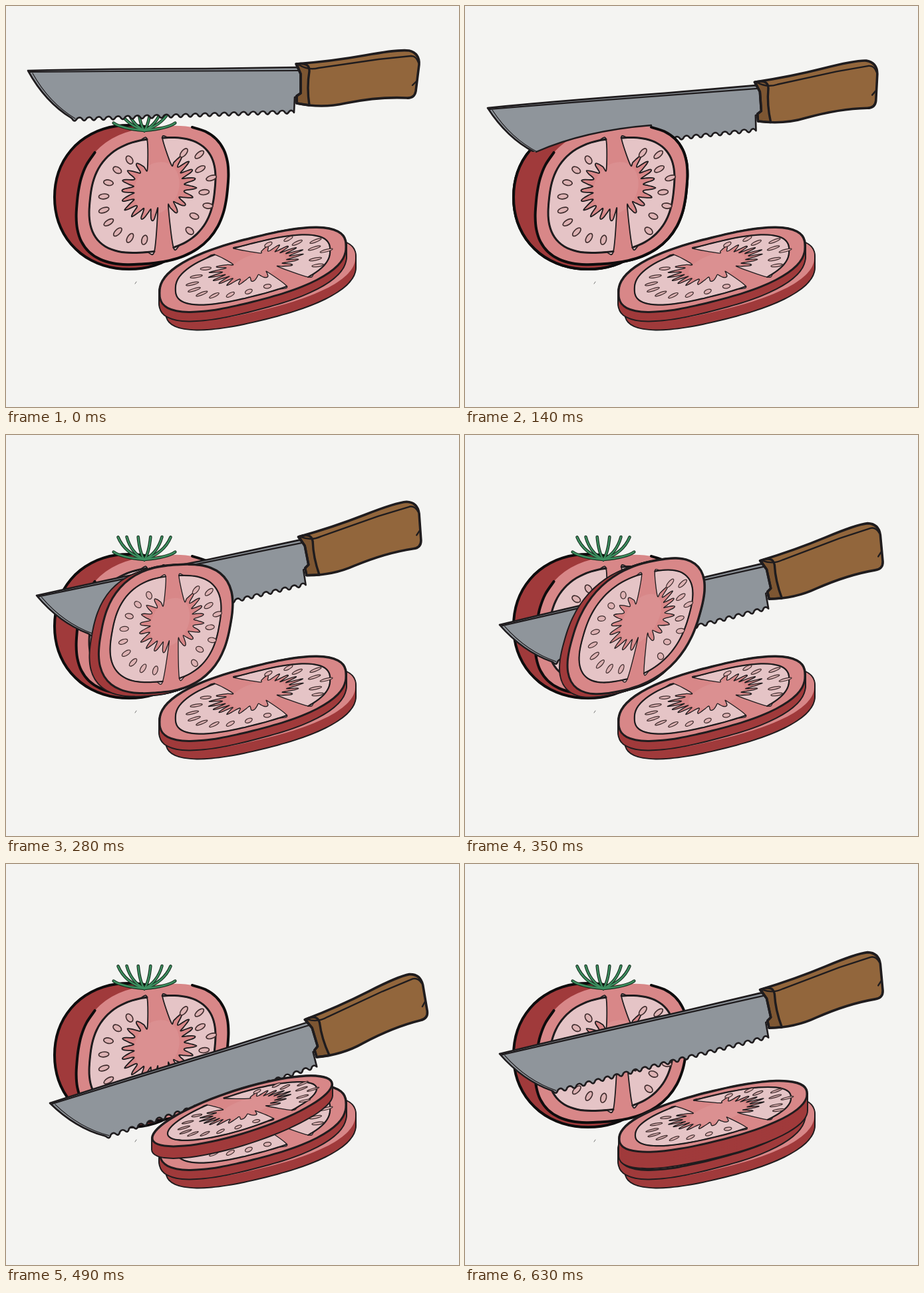
Write an HTML page with a canvas that moves like this. It is 681x602 px and loops after 0.7 s.

```html
<!DOCTYPE html>
<html lang="en">
<head>
<meta charset="utf-8">
<title>Slicing a tomato</title>
<style>
html, body { margin: 0; width: 100%; height: 100%; overflow: hidden; background: #f4f4f2; }
canvas { display: block; }
</style>
</head>
<body>
<canvas id="stage" width="681" height="602"></canvas>
<script>
const ctx = document.getElementById('stage').getContext('2d');
const INK = '#1f1c1e', RED = '#a03a3b', FLESH = '#d88788', CORE = '#db9091',
  PULP = '#e5c4c6', SEED = '#deb3b4', STEEL = '#8f959b', WOOD = '#92663c', LEAF = '#3d8f60';
const { sin, cos, PI } = Math, RAD = PI / 180;
ctx.lineJoin = ctx.lineCap = 'round';

function range(from, to, n, make) {
  return Array.from({ length: n }, (_, i) => make(from + (to - from) * i / (n - 1), i));
}

// Smooth path through points (Catmull-Rom)
function curve(pts, open) {
  const path = new Path2D(), n = pts.length;
  const at = i => open ? pts[Math.max(0, Math.min(n - 1, i))] : pts[(i + n) % n];
  path.moveTo(...pts[0]);
  for (let i = 0; i < (open ? n - 1 : n); i++) {
    const [a, b, c, d] = [at(i - 1), at(i), at(i + 1), at(i + 2)];
    path.bezierCurveTo(b[0] + (c[0] - a[0]) / 6, b[1] + (c[1] - a[1]) / 6,
      c[0] - (d[0] - b[0]) / 6, c[1] - (d[1] - b[1]) / 6, c[0], c[1]);
  }
  if (!open) path.closePath();
  return path;
}

function paint(path, fill, width, color = INK) {
  if (fill) { ctx.fillStyle = fill; ctx.fill(path); }
  if (width) { ctx.strokeStyle = color; ctx.lineWidth = width; ctx.stroke(path); }
}

// A disc is a superellipse of power p, sheared by slant and lean; spin turns its inside
function disc(x, y, rx, ry, options) {
  return { x, y, rx, ry, lean: 0, slant: 0, p: 2.2, spin: 0, dx: 0, dy: 0, line: 3, ...options };
}

function place(d, u, v) {
  return [d.x + u * d.rx + d.slant * v * d.ry, d.y + v * d.ry - d.lean * u * d.rx];
}

// Points along the rim, scaled by k, between two angles in degrees
function rim(d, k, from, to, n = 28) {
  return range(from, to, n, deg => {
    const c = cos(deg * RAD), s = sin(deg * RAD);
    const r = k / (Math.abs(c) ** d.p + Math.abs(s) ** d.p) ** (1 / d.p);
    return place(d, r * c, r * s);
  });
}

const outline = d => curve(rim(d, 1, 0, 350, 36));

// Wavy border of the core
function fingers(d, from, to, teeth) {
  const tx = 0.07 * cos(d.spin * RAD) + 0.11 * sin(d.spin * RAD);
  const ty = 0.07 * sin(d.spin * RAD) - 0.11 * cos(d.spin * RAD);
  return range(from, to, teeth * 6 + 1, (deg, i) => {
    const r = 0.42 - (0.08 + 0.02 * sin(i * 1.3)) * cos(i * PI / 3), a = (deg + d.spin) * RAD;
    return place(d, tx + r * cos(a), ty + r * sin(a));
  });
}

function seed(d, deg, r, weight) {
  const a = (deg + d.spin) * RAD;
  const shape = range(0, 315, 8, t => {
    const along = r + 0.068 * cos(t * RAD), across = 0.038 * sin(t * RAD);
    return place(d, along * cos(a) - across * sin(a), along * sin(a) + across * cos(a));
  });
  paint(curve(shape), SEED, weight, '#3f2c2d');
}

function lobe(d, weight, outer, inner, teeth) {
  const edge = rim(d, 0.83, outer[0] + d.spin, outer[1] + d.spin);
  paint(curve([...edge, ...fingers(d, ...inner, teeth)]), PULP, weight * 0.6);
  paint(curve(edge, true), null, weight);
}

function inside(d, weight) {
  paint(curve(range(0, 324, 10, t => place(d, 0.05 + 0.3 * cos(t * RAD), 0.38 * sin(t * RAD) - 0.1))), CORE);
  lobe(d, weight, [260, 83], [86, 238], 9);
  lobe(d, weight, [-86, 66], [62, -66], 8);
  range(94, 237, 9, deg => seed(d, deg, 0.65, weight * 0.55));
  range(-58, 46, 8, (deg, i) => seed(d, deg, i % 2 ? 0.79 : 0.69, weight * 0.55));
}

const face = disc(220, 284, 113, 103, { lean: .08, slant: -.1, p: 2.6 });
const body = disc(185, 287, 112, 108, { p: 2.1 });

function tomato() {
  paint(outline(body), RED, 4, '#0e0c0d');
  paint(outline(face), FLESH);
  paint(curve(rim(face, 1, -65, 220), true), null, 4, '#0e0c0d');
  inside(face, 3);
}

function stem() {
  for (const [width, color] of [[4.6, '#16301f'], [2.4, LEAF]])
    range(170, 10, 8, deg => {
      const dx = 47 * cos(deg * RAD), h = Math.min(33, 60 * sin(deg * RAD));
      paint(new Path2D(`M208 187Q${208 + dx * .75} ${187 - h * .3} ${208 + dx} ${186 - h}`), null, width, color);
    });
}

// Thick slice: its outline swept along dx, dy makes the skin
function slice(d) {
  const edge = outline(d);
  const sweep = (fill, width) => range(1, 0, 7, k => {
    ctx.save();
    ctx.translate(d.dx * k, d.dy * k);
    paint(edge, fill, width);
    ctx.restore();
  });
  sweep(null, 4);
  sweep(RED, 0);
  paint(edge, FLESH, d.line);
  inside(d, 2.2);
}

const pile = [
  disc(383, 411, 142, 46, { lean: .24, spin: -18, dy: 14, p: 2.4, line: 0 }),
  disc(371, 396, 140, 48, { lean: .25, spin: -18, dy: 13, p: 2.5 })
];

// Knife, drawn level with its tip at 33, 97
const blade = new Path2D('M33 97Q150 94 300 94L437 92L444 97V134L434 137L433 160');
for (let x = 433; x > 110; x -= 14.5) {
  const y = 157 + (433 - x) * 0.034;
  blade.quadraticCurveTo(x - 3, y - 2, x - 7, y + 1);
  blade.quadraticCurveTo(x - 11, y + 8, x - 14.5, y + 1.5);
}
blade.lineTo(98, 168);
blade.bezierCurveTo(72, 152, 50, 128, 33, 97);
const handle = new Path2D(
  'M436 87Q490 83 540 74T606 67Q622 71 621 88L616 128Q614 139 602 138Q560 136 510 146Q475 154 437 146V135L443 131V102Z');

function knife(x, y, degrees) {
  ctx.save();
  ctx.translate(x, y);
  ctx.rotate(degrees * RAD);
  ctx.translate(-33, -97);
  paint(blade, STEEL, 2.6);
  paint(new Path2D('M36 99L170 98L440 97'), null, 2.2);
  paint(new Path2D('M40 101C55 128 76 152 104 169'), null, 1.2);
  paint(handle, WOOD);
  paint(new Path2D('M437 87Q457 84 456 98Q452 122 456 149L437 146V135L443 131V102Z'), '#7d5632', 3.4);
  paint(new Path2D('M440 88Q454 97 470 93L560 80L609 75Q617 75 620 85M618 112L611 119'), null, 2.4);
  paint(handle, null, 3.6);
  ctx.restore();
}

// The part of the tomato in front of the sinking blade
function frontHalf() {
  const cut = 'M107 219Q180 187 280 179';
  ctx.save();
  ctx.clip(new Path2D(cut + 'H345V410H60V219Z'));
  tomato();
  ctx.restore();
  paint(new Path2D(cut), null, 2.4);
}

const opening = disc(230, 288, 105, 99, { lean: .07, slant: -.14, p: 2.6, dx: -12, dy: 3 });
const parting = disc(240, 291, 97, 96, { lean: .06, slant: -.18, p: 2.6, dx: -13, dy: 4 });
const leaning = disc(257, 287, 96, 98, { lean: .2, slant: -.28, p: 2.5, dx: -11, dy: 4 });
const falling = disc(330, 309, 127, 46, { lean: .5, spin: 48, p: 1.95, dx: -13, dy: 2 });
const landing = disc(355, 371, 135, 34, { lean: .3, spin: -18, p: 2, dy: 17 });
const landed = disc(373, 379, 141, 38, { lean: .24, spin: -18, p: 2.3, dy: 24 });

// at: knife tip and turn; front: blade sunk behind the face; cut: loose slice; over: it lies on the pile
const steps = [
  { at: [33, 97, 0] },
  { at: [33, 125, -2], front: true },
  { at: [34, 153, -4.1], front: true },
  { at: [40, 197, -7.8], cut: opening },
  { at: [46, 241, -11.2], cut: parting },
  { at: [52, 285, -12.4], cut: leaning },
  { at: [56, 322, -13.9], cut: falling },
  { at: [66, 359, -16.7], cut: landing, over: true },
  { at: [69, 373, -17.2], cut: landed, over: true },
  { at: [52, 285, -12.4], cut: landed, over: true }
];

function draw({ at, front, cut, over }) {
  ctx.fillStyle = '#f4f4f2';
  ctx.fillRect(0, 0, 681, 602);
  paint(new Path2D('M194 417L196 414'), null, 1, '#777');
  tomato();
  stem();
  knife(...at);
  if (front) frontHalf();
  if (cut && !over) slice(cut);
  pile.forEach(slice);
  if (over) slice(cut);
}

const start = performance.now();
function tick() {
  const t = Math.max(0, performance.now() - start) % 700;
  draw(steps[Math.floor(t / 70)]);
  requestAnimationFrame(tick);
}
tick();
</script>
</body>
</html>
```
